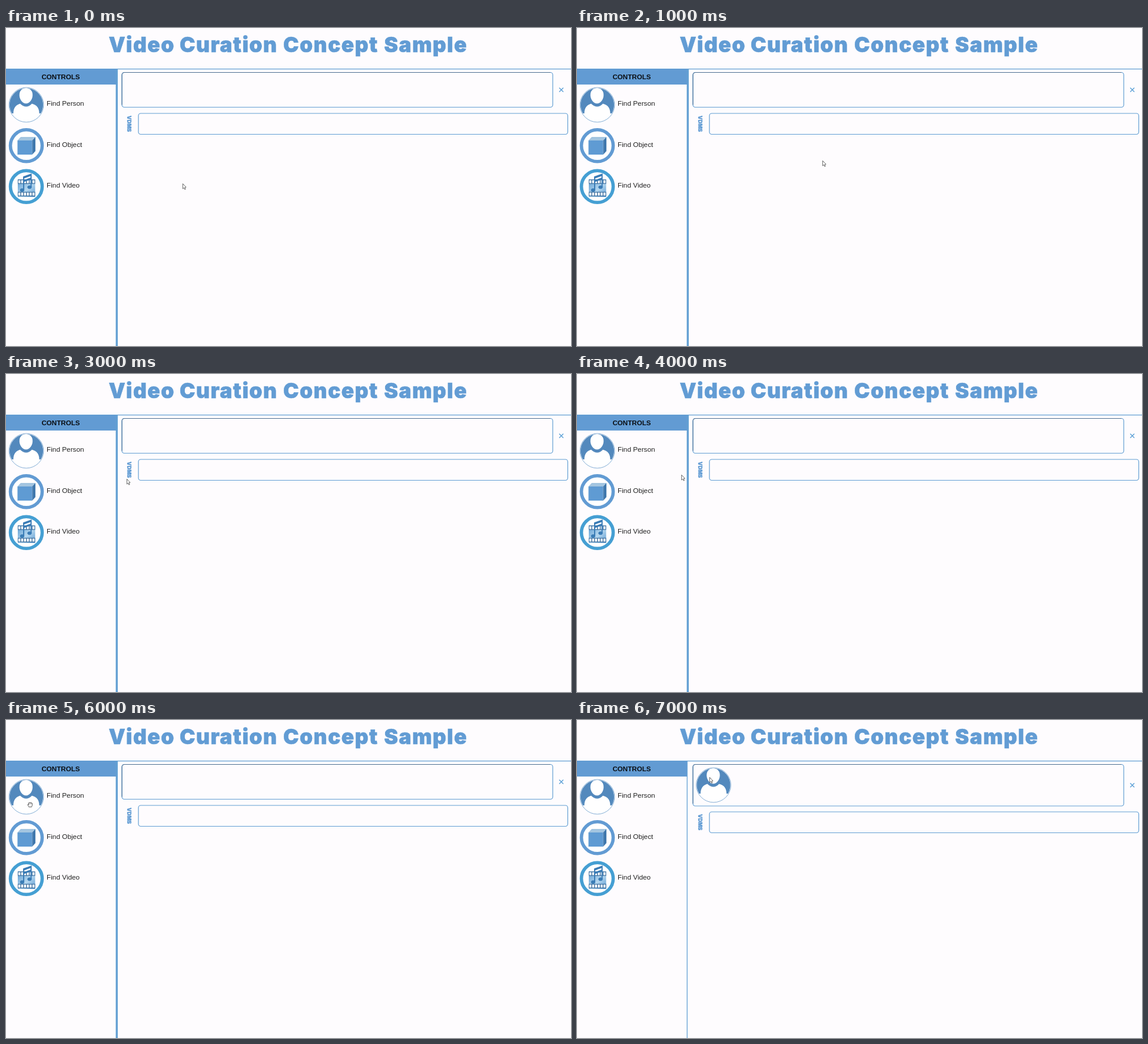
Recreate the animation shown at these times as an HTML page. Size 960 by 540 pixels, loop 8 s.

```html
<!DOCTYPE html>
<html lang="en">
<head>
<meta charset="utf-8">
<title>Video Curation</title>
<style>
  html, body { margin: 0; width: 100%; height: 100%; overflow: hidden; background: #fefcfe; }
  svg { display: block; }
  .label { font: 11.8px "Liberation Sans", Arial, sans-serif; fill: #222; }
  .head { font-size: 11.6px; font-weight: bold; fill: #0b0f14; text-anchor: middle; }
  .heavy { font-family: Inter, sans-serif; font-weight: 900; fill: #629cd4; stroke: #629cd4; }
  .title { font-size: 35.5px; letter-spacing: 1.4px; stroke-width: .6; }
  .line { fill: none; stroke: #629fd3; stroke-width: 1.2; }
</style>
</head>
<body>
<svg width="960" height="540" viewBox="0 0 960 540">
  <defs>
    <linearGradient id="sky" x2="1" y2="1">
      <stop stop-color="#5b9bd1"/><stop offset=".55" stop-color="#b5d7ef"/><stop offset="1" stop-color="#5797ce"/>
    </linearGradient>
    <g id="person">
      <circle r="29.4" fill="#fff" stroke="#78a5d1" stroke-width=".9"/>
      <path fill="#5389bd" d="M-24.5 14.5A28.5 28.5 0 1 1 24.5 14.5H22C22 6 18 0 9.5-2Q0 8-10.5-2C-18 0-22 6-22 14.5Z"/>
      <path fill="#fff" d="M-.5-28.5C7-28.5 11-23 10.7-16C10.2-8 5-2.3-.5-2.3S-11.2-8-11.7-16C-12-23-8-28.5-.5-28.5Z"/>
    </g>
    <path id="arrow" d="M.4.4V9L2.4 7.3 3.8 10.2 5.1 9.6 3.8 6.8 6 6.3Z" fill="#fff" stroke="#444" stroke-width=".8" stroke-linejoin="round"/>
    <g id="hand">
      <path d="M-2.2 4.2C-2.8 2.4-4.4 1-4.2.1Q-3.4-.8-2.2.7L-2.7-2.4Q-2-4-1.2-2.6Q-.6-4.8.4-3Q1.4-4.3 2-2.4Q3.4-3.2 3.6-1.3L3.4 1.8 2.4 4.2Z"
        fill="#fff" stroke="#333" stroke-width=".8" stroke-linejoin="round"/>
      <path d="M-1-2.4V-.5M.6-2.7V-.5M2-2.2V-.4" stroke="#555" stroke-width=".5"/>
    </g>
  </defs>

  <text class="heavy title" y="40.5"><tspan x="174.5">Video</tspan> <tspan x="295">Curation</tspan> <tspan x="471">Concept</tspan> <tspan x="642.5">Sample</tspan></text>

  <path d="M0 69.6H960" class="line"/>
  <path d="M0 70H187V96H0Z" fill="#629bd3"/>
  <rect id="divider" x="186.5" y="70" width="3.4" height="470" fill="#629fd3"/>
  <text class="label head" x="93" y="86.5">CONTROLS</text>
  <text class="label" x="69" y="132.2">Find Person</text>
  <text class="label" x="69" y="201.8">Find Object</text>
  <text class="label" x="69" y="271.3">Find Video</text>

  <use href="#person" x="34.5" y="130.5"/>

  <circle cx="34.5" cy="199.8" r="27" fill="#fff" stroke="#629bd3" stroke-width="5.6"/>
  <path fill="#5f9bd3" d="M19.5 191H44.5V215H19.5Z"/>
  <path fill="#a3c5e0" d="M19.5 191 25 185H50L44.5 191Z"/>
  <path fill="#4179ad" d="M44.5 191 50 185V209L44.5 215Z"/>

  <circle cx="34.5" cy="269.3" r="27" fill="#fff" stroke="#459fd3" stroke-width="5.6"/>
  <path fill="url(#sky)" d="M20 257H49.5V287H20Z"/>
  <path stroke="#3d70a0" stroke-width="7.4" d="M20 261H49.5M20 282H49.5"/>
  <path stroke="#fff" stroke-width="5" stroke-dasharray="3.4 1.4" d="M21 261H49M21 282H49"/>
  <g fill="#3a7cb6" stroke="#3a7cb6">
    <path fill="none" stroke-width="2" d="M30 275V253L42.6 248.5V270"/>
    <path stroke-width="3" d="M30 254 42.6 249.5M30 260 42.6 255.5"/>
    <ellipse cx="27.4" cy="275.2" rx="3.3" ry="2.5"/>
    <ellipse cx="40" cy="270.3" rx="3.3" ry="2.5"/>
  </g>

  <rect id="drop" class="line" x="197" y="75.5" width="732" height="59" rx="4"/>
  <path id="shade" fill="none" stroke="#4d6f91"/>
  <use id="dropped" href="#person" x="232" y="110.5"/>
  <path id="close" d="M940 101.5 947 108.5M947 101.5 940 108.5" stroke="#5b9fd6" stroke-width="1.4"/>
  <g id="query">
    <text class="heavy" font-size="8.8" transform="translate(206 148.8) rotate(90)" stroke-width=".3">VDMS</text>
    <rect class="line" x="225" y="145" width="729.5" height="35.5" rx="4"/>
  </g>
  <use id="cursor"/>
</svg>
<script>
  const LOOP = 8000, STEP = 1000;
  // Pointer position for each second
  const pointer = [[300, 264], [417, 225], [256, 186], [205, 178], [177.3, 171], [95, 152], [41, 143.5], [225, 97]];
  const el = id => document.getElementById(id);
  const set = (id, attrs) => {
    for (const name in attrs) el(id).setAttribute(name, attrs[name]);
  };

  function draw(time) {
    const step = Math.floor(time % LOOP / STEP);
    const dropped = step === 7;
    const grow = dropped ? 11.5 : 0;
    const [x, y] = pointer[step];

    set('cursor', { href: step === 6 ? '#hand' : '#arrow', x, y });
    set('dropped', { visibility: dropped ? 'visible' : 'hidden' });
    set('divider', { width: dropped ? 1.3 : 3.4 });
    set('drop', { height: 59 + grow });
    set('shade', { d: `M197 ${130.5 + grow}V79.5Q197 75.5 201 75.5H925` });
    set('close', { transform: `translate(0 ${grow / 2})` });
    set('query', { transform: `translate(0 ${dropped ? 11 : 0})` });
  }

  function tick() {
    draw(performance.now());
    requestAnimationFrame(tick);
  }
  tick();
</script>
</body>
</html>
```
